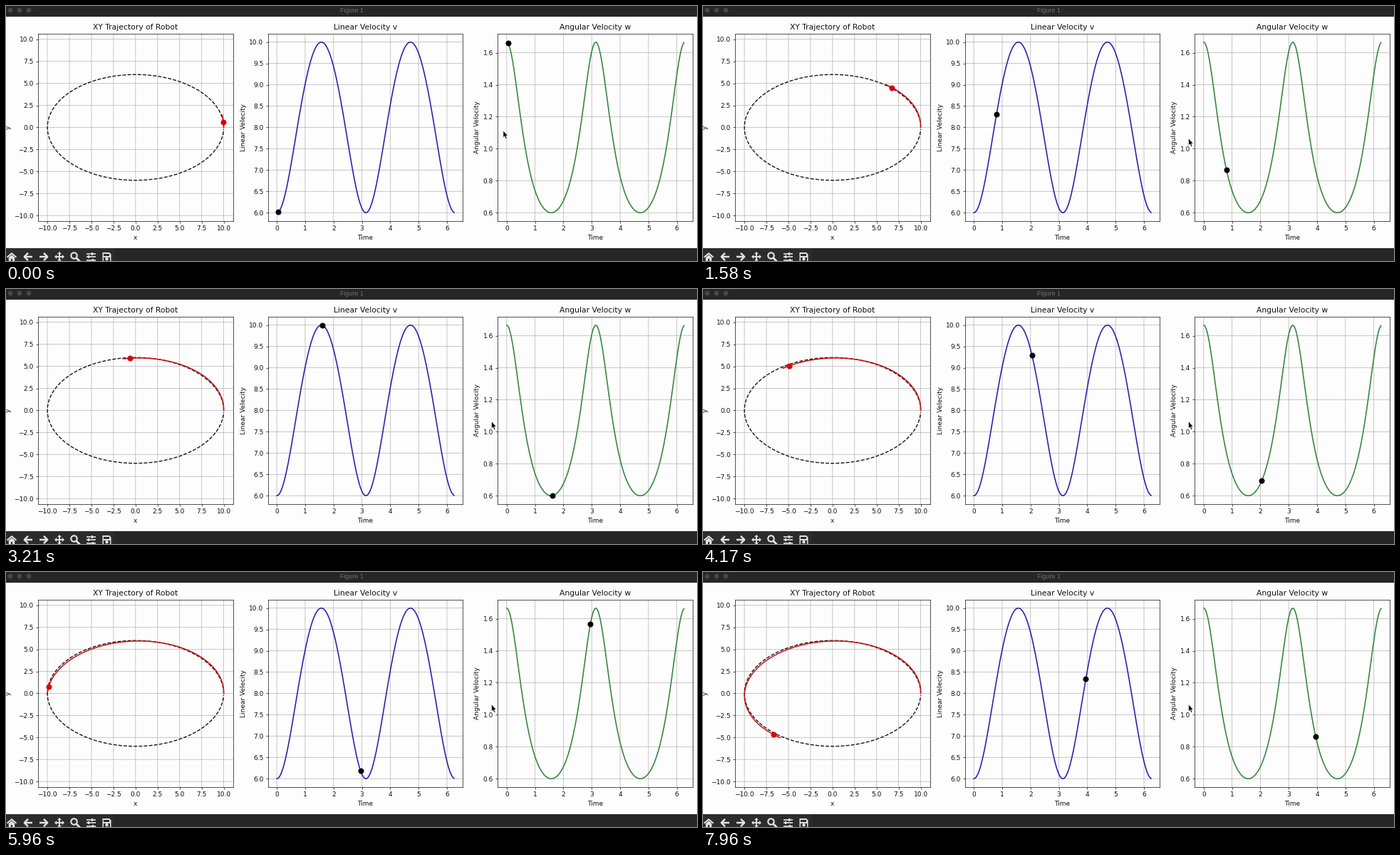
Write a matplotlib script that moves like this. It is 970 px wide and 358 px high and loops after 8 s.

```python
import numpy as np
import matplotlib.pyplot as plt
from matplotlib.animation import FuncAnimation
from matplotlib.patches import Circle, Polygon, Rectangle

W, H, DPI = 970, 358, 64
INTERVAL, FRAMES = 40, 200
STEP_MS, PHASE_MS = 102, 16
A, B, DT = 10, 6, 0.05

PAPER, INK, GRID = "#fdfdfd", "#101010", "#b6b6b9"
BLUE, GREEN, RED = "#2a1eac", "#34863c", "#cc1016"
BAR, PANEL, ICON = "#262626", "#2c2c2c", "#e2e2e2"

plt.rcParams.update({
    "font.family": "DejaVu Sans", "font.size": 10.1,
    "axes.titlesize": 12.1, "axes.labelsize": 10.1,
    "axes.facecolor": PAPER, "axes.edgecolor": INK,
    "axes.labelcolor": INK, "axes.titlecolor": INK,
    "xtick.color": INK, "ytick.color": INK,
    "grid.color": GRID, "grid.linewidth": 0.85,
})

# Speeds along the ellipse, and the robot path integrated from them
time = np.arange(0, 2 * np.pi, DT)
speed = np.hypot(A * np.sin(time), B * np.cos(time))
turn = A * B / speed**2


def integrate():
    pose = np.array([A, 0, np.pi / 2])
    poses = [pose]
    for v, w in zip(speed, turn):
        pose = pose + DT * np.array([v * np.cos(pose[2]), v * np.sin(pose[2]), w])
        poses.append(pose)
    return np.array(poses)


path = integrate()

fig = plt.figure(figsize=(W / DPI, H / DPI), dpi=DPI, facecolor=PAPER)


def panel(left, title, xlabel, ylabel, xlim, ylim, xticks, yticks):
    ax = fig.add_axes([left / W, (H - 302.2) / H, 273.7 / W, 263.5 / H])
    ax.set(title=title, xlabel=xlabel, ylabel=ylabel, xlim=xlim, ylim=ylim,
           xticks=xticks, yticks=yticks)
    ax.grid(True, snap=False)
    ax.set_axisbelow(True)
    return ax


def padded(values):
    pad = 0.05 * np.ptp(values)
    return values.min() - pad, values.max() + pad


def dot(ax, color):
    return ax.plot([], [], "o", color=color, ms=8, zorder=5)[0]


tens = np.arange(-10, 10.1, 2.5)
ax_xy = panel(45, "XY Trajectory of Robot", "x", "y",
              (-11.06, 11.06), (-10.65, 10.65), tens, tens)
ax_v = panel(367.7, "Linear Velocity v", "Time", "Linear Velecity",
             padded(time), padded(speed), range(7), np.arange(6, 10.1, 0.5))
ax_w = panel(690.4, "Angular Velocity w", "Time", "Angular Velocity",
             padded(time), padded(turn), range(7), np.arange(0.6, 1.7, 0.2))

ax_xy.plot(A * np.cos(time), B * np.sin(time), "--", color=INK, lw=1.515)
ax_v.plot(time, speed, color=BLUE, lw=1.8)
ax_w.plot(time, turn, color=GREEN, lw=1.8)

trail, = ax_xy.plot([], [], color=RED, lw=1.7)
heading, = ax_xy.plot([], [], color=RED, lw=1.8)
robot = dot(ax_xy, "#d4060c")
v_dot = dot(ax_v, "black")
w_dot = dot(ax_w, "black")

# Window frame, in pixel coordinates
win = fig.add_axes([0, 0, 1, 1], zorder=10)
win.set(xlim=(0, W), ylim=(H, 0))
win.axis("off")


def box(x, y, w, h, color):
    win.add_patch(Rectangle((x, y), w, h, fc=color, ec="none"))


def stroke(xs, ys, lw=2.8):
    win.plot(xs, ys, color=ICON, lw=lw, solid_capstyle="butt")


def fill(points, color=ICON):
    win.add_patch(Polygon(points, fc=color, ec="none"))


def title_bar():
    box(0, 0, W, 15, BAR)
    for x in (6, 19, 32):
        win.add_patch(Circle((x, 6), 3.4, fc="#474747", ec="none"))
    win.text(485.5, 6.2, "Figure 1", color="#707070", fontsize=10,
             family="Liberation Sans", ha="center", va="center")


def tool_bar():
    box(0, 340, W, 18, BAR)
    box(0, 340, 152, 18, PANEL)
    # home
    stroke([1.5, 8, 14.5], [352.8, 347.2, 352.8], 2.2)
    fill([(3.8, 353), (8, 349.3), (12.2, 353), (12.2, 358), (3.8, 358)])
    box(7, 354.5, 2, 4, PANEL)
    # back and forward
    for x, s in ((31, 1), (53, -1)):
        stroke([x - 5 * s, x + 6 * s], [352, 352])
        stroke([x, x - 5.2 * s, x], [346.8, 352, 357.2])
    # pan
    stroke([69, 81], [352, 352], 2.2)
    stroke([75, 75], [346, 358], 2.2)
    for dx, dy in ((1, 0), (-1, 0), (0, 1), (0, -1)):
        tip = np.array([75 + 7 * dx, 352 + 7 * dy])
        back = tip - 3.2 * np.array([dx, dy])
        side = 3 * np.array([dy, dx])
        fill([tip, back + side, back - side])
    # zoom
    win.add_patch(Circle((95.5, 350.5), 4.2, fc="none", ec=ICON, lw=2.4))
    stroke([98.5, 104], [353.5, 359], 3.2)
    # sliders
    for y, knob in ((347.5, 121), (352, 116), (356.5, 122)):
        stroke([113, 125.5], [y, y], 1.9)
        stroke([knob, knob], [y - 2, y + 2], 2.4)
    # save
    fill([(135.5, 346), (145, 346), (147.5, 348.5), (147.5, 358), (135.5, 358)])
    box(137.3, 347.6, 7.2, 3, PANEL)
    box(137.3, 352.8, 8.4, 6, PANEL)
    win.add_patch(Circle((141.5, 355.2), 2.2, fc=ICON, ec="none"))


title_bar()
tool_bar()

ARROW = np.array([(0, 0), (0, 9.6), (2, 7.8), (3.6, 11.4), (5.2, 10.7),
                  (3.7, 7.2), (6.4, 7)])
cursor = Polygon(ARROW, fc="black", ec="white", lw=0.6)
win.add_patch(cursor)


def update(i):
    ms = i * INTERVAL
    n = 1 + (ms + PHASE_MS) // STEP_MS
    x, y, theta = path[n + 1]
    trail.set_data(path[:n + 2, 0], path[:n + 2, 1])
    heading.set_data([x, x + 0.8 * np.cos(theta)], [y, y + 0.8 * np.sin(theta)])
    robot.set_data([x], [y])
    v_dot.set_data([time[n]], [speed[n]])
    w_dot.set_data([time[n]], [turn[n]])

    u = np.clip((ms - 100) / 400, 0, 1)
    ease = u * u * (3 - 2 * u)
    cursor.set_xy(ARROW + [698 - 16.3 * ease, 175 + 11 * ease])
    return trail, heading, robot, v_dot, w_dot, cursor


anim = FuncAnimation(fig, update, frames=FRAMES, interval=INTERVAL,
                     repeat=True, repeat_delay=0)
plt.show()
```
